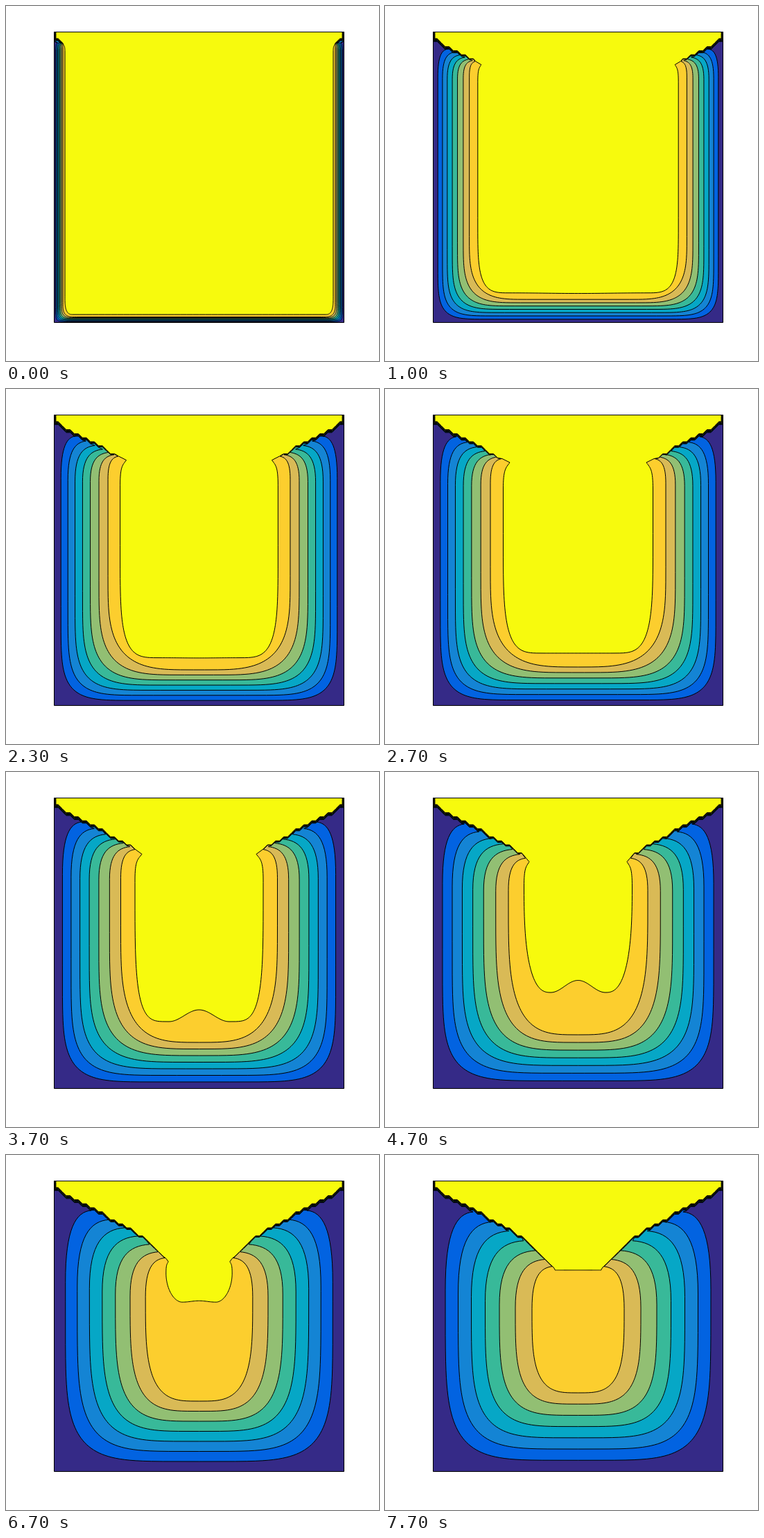
Write an HTML page with a canvas that moves like this. It is 538 px wide and 512 px high and loops after 8 s.

```html
<!DOCTYPE html>
<html lang="en">
<head>
<meta charset="utf-8">
<title>Cooling contours</title>
<style>
html, body { margin: 0; width: 100%; height: 100%; overflow: hidden; background: #fff; }
canvas { display: block; }
</style>
</head>
<body>
<canvas id="stage" width="538" height="512"></canvas>
<script>
const ctx = document.getElementById('stage').getContext('2d');
const LOOP = 8000, LEFT = 69.5, RIGHT = 487.5, TOP = 37.5, BOTTOM = 456.5;
const MID = (LEFT + RIGHT) / 2, CELL = (RIGHT - LEFT) / 72;
const COLORS = ['#352a87', '#0263e1', '#1484d4', '#06a7c6', '#38b999',
  '#92bf73', '#d9ba56', '#fcce2e', '#f7fa0d'];
const SIDE = [0, 17, 35.5, 54.5, 74.5, 95, 118, 142].map(v => v / 142);
const JOIN = [0, 0.33, 0.49, 0.63, 0.75, 0.85, 0.93, 0.99];

// step, front end, side width, floor height, then the innermost contour:
// tip x y, wall x y, lobe x y, middle y, corner power
const KEYS = [
  [0, 82, 12, 8, 83, 56, 85, 66, 97, 445, 445, 3],
  [5, 148, 66, 42.5, 159, 95, 151.5, 125, 215, 402.5, 403.5, 4.5],
  [8, 169, 82, 55.5, 180, 106, 170.5, 145, 230, 381, 381, 4],
  [11, 187, 95.5, 66.5, 196, 118.5, 186, 156, 235, 360, 343, 4],
  [14, 204, 108, 77.5, 208, 129.5, 200.5, 165, 239, 318, 300.5, 2.6],
  [17, 218, 119.5, 88.5, 222.5, 142, 215.5, 176, 250, 262, 258, 1.8],
  [23, 243, 142, 113.5, 245, 165, 245, 166, 258, 166, 166, 2]
];

// Diffusion grows with the square root of time, so blend along that scale.
function stateAt(step) {
  const root = v => Math.sqrt(v + 0.18);
  let i = 0;
  while (i < KEYS.length - 2 && step >= KEYS[i + 1][0]) i++;
  const a = KEYS[i], b = KEYS[i + 1];
  const f = (root(step) - root(a[0])) / (root(b[0]) - root(a[0]));
  const [, end, side, floor, tipX, tipY, wallX, wallY, lobeX, lobeY, midY, power] =
    a.map((v, j) => v + (b[j] - v) * f);
  return { end, side, floor, tipX, tipY, wallX, wallY, lobeX, lobeY, midY, power };
}

function frontDepth(x) {
  const u = x - 70;
  return 0.54 * u + 0.00355 * Math.max(0, u - 95) ** 2;
}

function addFront(pts, level, endX) {
  const shift = (8 - level) * 0.6;
  pts.push([LEFT + 0.3 * level, TOP]);
  for (let x = LEFT; x < endX - 1; x += CELL) {
    const y = 47 + shift + CELL * Math.round(frontDepth(x) / CELL);
    pts.push([Math.max(x, LEFT + 0.3 * level), y]);
  }
  const end = [endX, 47 + shift + frontDepth(endX)];
  pts.push(end);
  return end;
}

function addBend(pts, [x0, y0], x1, y1, drop) {
  const dx = x0 - x1, dy = y1 - y0;
  for (let i = 1; i <= 16; i++) {
    const t = i / 16, s = 1 - t;
    const a = s ** 3, b = 3 * s * s * t, c = 3 * s * t * t, d = t ** 3;
    pts.push([
      a * x0 + b * (x1 + 0.4 * dx) + (c + d) * x1,
      a * y0 + b * (y0 + drop) + c * (y0 + 0.25 * dy) + d * y1
    ]);
  }
}

function addCorner(pts, x, y, w, h, power) {
  for (let i = 0; i <= 40; i++) {
    const t = i / 40 * Math.PI / 2;
    pts.push([
      x + w * (1 - Math.max(0, Math.cos(t)) ** (2 / power)),
      y - h * (1 - Math.sin(t) ** (2 / power))
    ]);
  }
}

function outerContour(s, level) {
  const pts = [];
  const join = addFront(pts, level, 70 + (s.end - 70) * JOIN[level]);
  const x = 70 + s.side * SIDE[level];
  const y = join[1] + s.side * (0.85 - 0.06 * level);
  const base = BOTTOM - s.floor * level / 7;
  const size = 1.6 * s.side;
  addBend(pts, join, x, y, 2);
  addCorner(pts, x, base, Math.min(size, MID - x), Math.min(size * 1.1, base - y),
    5.2 - 0.25 * level);
  return pts;
}

function innerContour(s) {
  const pts = [], tip = [s.tipX, s.tipY];
  addFront(pts, 8, s.end);
  pts.push(tip);
  addBend(pts, tip, s.wallX, s.wallY, 0.2 * (s.wallY - s.tipY));
  addCorner(pts, s.wallX, s.lobeY, s.lobeX - s.wallX,
    Math.min(2.1 * s.side, s.lobeY - s.wallY), s.power);
  for (let i = 1; i <= 20; i++) {
    const t = i / 20;
    pts.push([s.lobeX + (MID - s.lobeX) * t,
      s.midY + (s.lobeY - s.midY) * (1 + Math.cos(Math.PI * t)) / 2]);
  }
  return pts;
}

function paint(pts, color) {
  const mirror = pts.map(([x, y]) => [2 * MID - x, y]).reverse();
  ctx.beginPath();
  for (const [x, y] of pts.concat(mirror)) ctx.lineTo(x, y);
  ctx.closePath();
  ctx.fillStyle = color;
  ctx.fill();
  ctx.stroke();
}

function draw(ms) {
  const step = Math.floor((Math.floor(ms / 100) + 0.4) * 0.3);
  const s = stateAt(step);
  ctx.fillStyle = '#fff';
  ctx.fillRect(0, 0, 538, 512);
  ctx.fillStyle = COLORS[0];
  ctx.fillRect(LEFT, TOP, RIGHT - LEFT, BOTTOM - TOP);
  ctx.strokeStyle = '#000';
  ctx.lineWidth = 1;
  ctx.lineJoin = 'round';
  for (let level = 1; level < 8; level++) paint(outerContour(s, level), COLORS[level]);
  paint(innerContour(s), COLORS[8]);
  ctx.strokeRect(LEFT, TOP, RIGHT - LEFT, BOTTOM - TOP);
}

const start = performance.now();
function tick() {
  draw((performance.now() - start) % LOOP);
  requestAnimationFrame(tick);
}
tick();
</script>
</body>
</html>
```
